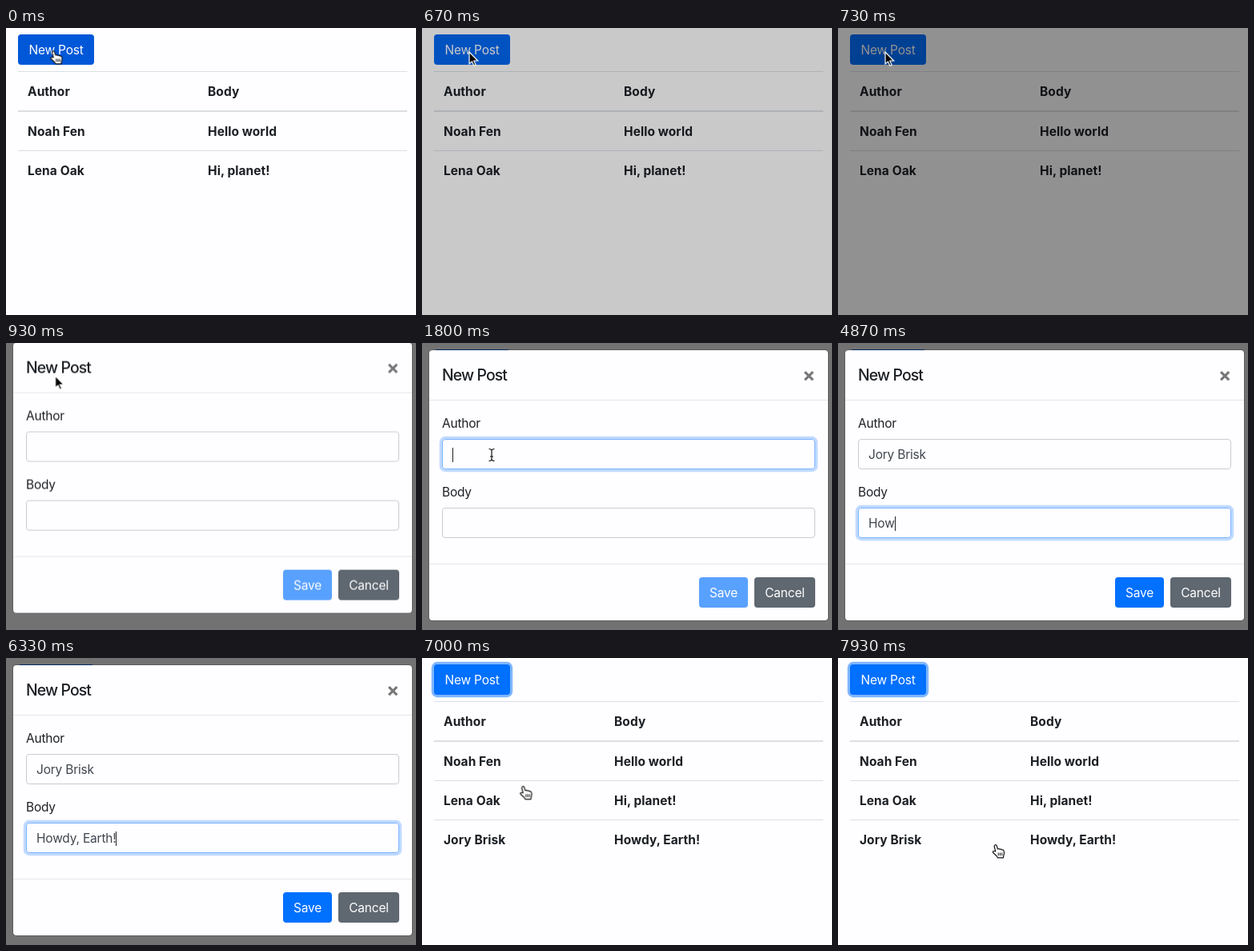
An HTML page for the animation above (8 s loop, 512 by 359 pixels).

```html
<!DOCTYPE html>
<html lang="en">
<head>
<meta charset="utf-8">
<title>New Post</title>
<style>
* { box-sizing: border-box; }
html, body { margin: 0; width: 100%; height: 100%; overflow: hidden; background: #fefdff; }
body {
  position: relative;
  font: 430 15.5px/25px Inter, Roboto, sans-serif;
  letter-spacing: -.014em;
  color: #1b1f24;
  cursor: default;
}
#page, #page *, #modal, #modal > *, #shade, #cursor, #cursor svg { position: absolute; }
#page, #shade { inset: 0; }
:where(#page, #modal, #cursor, #shade, #page *, #modal *, #cursor *) {
  animation-duration: 8s;
  animation-iteration-count: infinite;
  animation-timing-function: linear;
}

.btn {
  height: 38px; border-radius: 4px; line-height: 39px;
  text-align: center; color: #fff; background: #0070ff;
}
#new { left: 15px; top: 8px; width: 95px; animation-name: hover, refocus; }
.line { left: 15px; width: 486px; height: 1px; background: #dbdfe3; }
.cell { font-weight: 700; letter-spacing: .004em; white-space: nowrap; left: 27px; }
.body { left: 252px; animation-name: shift; animation-timing-function: step-end; }
#added { opacity: 0; animation-name: added; animation-timing-function: step-end; }

#shade { background: #000; opacity: 0; animation-name: shade; }
#modal {
  left: 8px; top: 8px; width: 500px; height: 340px;
  background: #fefdff; background-clip: padding-box;
  border: 1px solid rgba(0,0,0,.2); border-radius: 5px;
  opacity: 0; animation-name: fade, slide;
}
#modal h5 {
  margin: 0; left: 16px; top: 16px;
  font-size: 19.4px; line-height: 30px; font-weight: 530; letter-spacing: -.045em;
}
#close { right: 16px; top: 18px; font-size: 24px; font-weight: 700; color: #777; }
.rule { left: 0; right: 0; height: 1px; background: #e5e8eb; }
label { left: 16px; }
.field {
  left: 16px; width: 466px; height: 38px; padding: 6px 12px;
  border: 1px solid #c8cdd3; border-radius: 4px;
  color: #3f464e; white-space: pre;
}
#author { top: 111px; animation-name: author; }
#text { top: 197px; animation-name: text; }
.field i { font-style: normal; font-size: 0; animation-timing-function: step-end; }
#author i { animation-name: keep-long; }
#text i { animation-name: keep-short; }
.field b {
  display: inline-block; width: 1px; height: 18px; margin-right: -1px;
  vertical-align: -4px; background: #222; opacity: 0; animation-timing-function: step-end;
}
#author b { animation-name: caret-a; }
#text b { animation-name: caret-b; }
#save { left: 337px; top: 284px; width: 61px; opacity: .65; animation-name: enable; }
#cancel { left: 406px; top: 284px; width: 76px; background: #5f6770; }

#cursor { left: 0; top: 0; animation-name: move; }
#cursor svg { left: 0; top: 0; overflow: visible; opacity: 0; animation-timing-function: step-end; }
#hand { animation-name: hand; }
#arrow { animation-name: arrow; }
#beam { animation-name: beam; }

@keyframes hover { 0%, 7.66% { background: #0058d8; } 8.75%, 100% { background: #0070ff; } }
@keyframes refocus {
  0%, 83.75% { box-shadow: 0 0 0 0 rgba(0,112,255,0); }
  85.6%, 100% { box-shadow: 0 0 0 3.2px rgba(0,112,255,.5); }
}
@keyframes shift { 0% { left: 252px; } 79.5%, 100% { left: 240px; } }
@keyframes added { 0% { opacity: 0; } 79.5%, 100% { opacity: 1; } }
@keyframes shade {
  0%, 7.68% { opacity: 0; }
  9.56%, 81.375% { opacity: .55; }
  83.25%, 100% { opacity: 0; }
}
@keyframes fade {
  0%, 9.275% { opacity: 0; }
  11.15%, 79.5% { opacity: 1; }
  81.375%, 100% { opacity: 0; }
}
@keyframes slide {
  0% { transform: translateY(-50px); }
  9.275% { transform: translateY(-50px); animation-timing-function: ease-out; }
  13.025% { transform: none; }
  79.5% { transform: none; animation-timing-function: ease-out; }
  83.25%, 100% { transform: translateY(-50px); }
}
@keyframes author {
  0%, 20%, 51%, 100% { border-color: #c8cdd3; box-shadow: 0 0 0 0 rgba(0,112,255,0); }
  21.875%, 49.125% { border-color: #78b2ff; box-shadow: 0 0 0 3.2px rgba(0,112,255,.25); }
}
@keyframes text {
  0%, 49.125% { border-color: #c8cdd3; box-shadow: 0 0 0 0 rgba(0,112,255,0); }
  51%, 100% { border-color: #78b2ff; box-shadow: 0 0 0 3.2px rgba(0,112,255,.25); }
}
@keyframes keep-long { 0% { font-size: 1em; } 60%, 100% { font-size: 0; } }
@keyframes keep-short { 0% { font-size: 1em; } 30%, 100% { font-size: 0; } }
@keyframes caret-a { 0% { opacity: 0; } 20% { opacity: 1; } 49.125%, 100% { opacity: 0; } }
@keyframes caret-b { 0% { opacity: 0; } 49.125%, 100% { opacity: 1; } }
@keyframes enable { 0%, 25.875% { opacity: .65; } 27.75%, 100% { opacity: 1; } }
@keyframes move {
  0% { transform: translate(59.5px, 29px); }
  9.125% { transform: translate(59px, 30px); }
  11.625% { transform: translate(61.5px, 41px); animation-timing-function: ease-in-out; }
  21.75% { transform: translate(87px, 140px); }
  84.5% { transform: translate(87px, 140px); animation-timing-function: ease-in-out; }
  94.5% { transform: translate(296px, 250px); animation-timing-function: ease-in-out; }
  97.25% { transform: translate(182px, 226px); animation-timing-function: ease-in-out; }
  99%, 100% { transform: translate(197px, 234px); }
}
@keyframes hand { 0% { opacity: 1; } 8% { opacity: 0; } 84.5%, 100% { opacity: 1; } }
@keyframes arrow { 0% { opacity: 0; } 8% { opacity: 1; } 18.7%, 100% { opacity: 0; } }
@keyframes beam { 0% { opacity: 0; } 18.7% { opacity: 1; } 25.875%, 100% { opacity: 0; } }
</style>
</head>
<body>
<div id="page">
  <div id="new" class="btn">New Post</div>
  <div class="line" style="top:54px"></div>
  <div class="cell" style="top:67px">Author</div>
  <div class="cell body" style="top:67px">Body</div>
  <div class="line" style="top:103px;height:2px"></div>
  <div class="cell" style="top:117px">Noah Fen</div>
  <div class="cell body" style="top:117px">Hello world</div>
  <div class="line" style="top:153px"></div>
  <div class="cell" style="top:166px">Lena Oak</div>
  <div class="cell body" style="top:166px">Hi, planet!</div>
  <div id="added">
    <div class="line" style="top:202px"></div>
    <div class="cell" style="top:215px">Jory Brisk</div>
    <div class="cell body" style="top:215px">Howdy, Earth!</div>
  </div>
</div>

<div id="shade"></div>

<div id="modal">
  <h5>New Post</h5>
  <div id="close">×</div>
  <div class="rule" style="top:62px"></div>
  <label style="top:79px">Author</label>
  <div id="author" class="field"><b></b></div>
  <label style="top:165px">Body</label>
  <div id="text" class="field"><b></b></div>
  <div class="rule" style="top:267px"></div>
  <div id="save" class="btn">Save</div>
  <div id="cancel" class="btn">Cancel</div>
</div>

<div id="cursor">
  <svg id="hand" width="1" height="1" stroke="#111" stroke-linejoin="round">
    <g transform="translate(-.8 -.3) scale(1.12 1.04)">
      <path fill="#fff" stroke-width="1.1" d="M.5 8L-.9 2Q-1.2.3.2 0Q1.4-.2 1.8 1.2L2.9 5Q4.5 4.2 5.2 5.4Q6.8 4.8 7.5 6Q9.3 5.7 9.8 7.4Q10.7 10 9.5 13L9.1 15.5H2.9Q2.3 13.6-.1 11.6Q-2.5 9.6-2.7 8.4Q-1.7 6.8.5 8Z"/>
      <path fill="none" stroke-width=".9" d="M3.6 9.5V13M5.6 9.5V13M7.6 9.5V13"/>
    </g>
  </svg>
  <svg id="arrow" width="1" height="1">
    <path stroke="#fff" stroke-width="1.2" d="M0 0V15L3.4 11.9L5.8 17.2L8.1 16.2L5.8 11H10.6Z"/>
  </svg>
  <svg id="beam" width="1" height="1" fill="none">
    <path id="bar" stroke="#fff" stroke-width="2.6" d="M-3.5-7.5Q0-7.5 0-5Q0-7.5 3.5-7.5M0-5V5M-3.5 7.5Q0 7.5 0 5Q0 7.5 3.5 7.5M-2 2H2"/>
    <path stroke="#111" stroke-width="1.2" d="M-3.5-7.5Q0-7.5 0-5Q0-7.5 3.5-7.5M0-5V5M-3.5 7.5Q0 7.5 0 5Q0 7.5 3.5 7.5M-2 2H2"/>
  </svg>
</div>

<script>
// One span per letter; its delay is the moment the key is pressed.
function type(id, text, times) {
  const field = document.getElementById(id);
  const caret = field.querySelector('b');
  [...text].forEach((char, i) => {
    const key = document.createElement('i');
    key.textContent = char;
    key.style.animationDelay = times[i] + 'ms';
    field.insertBefore(key, caret);
  });
}
type('author', 'Jory Brisk', [2070, 2330, 2470, 2600, 2800, 3000, 3200, 3330, 3470, 3530]);
type('text', 'Howdy, Earth!',
  [4600, 4730, 4870, 5000, 5130, 5270, 5330, 5470, 5670, 5730, 5870, 6000, 6150]);
</script>
</body>
</html>
```
